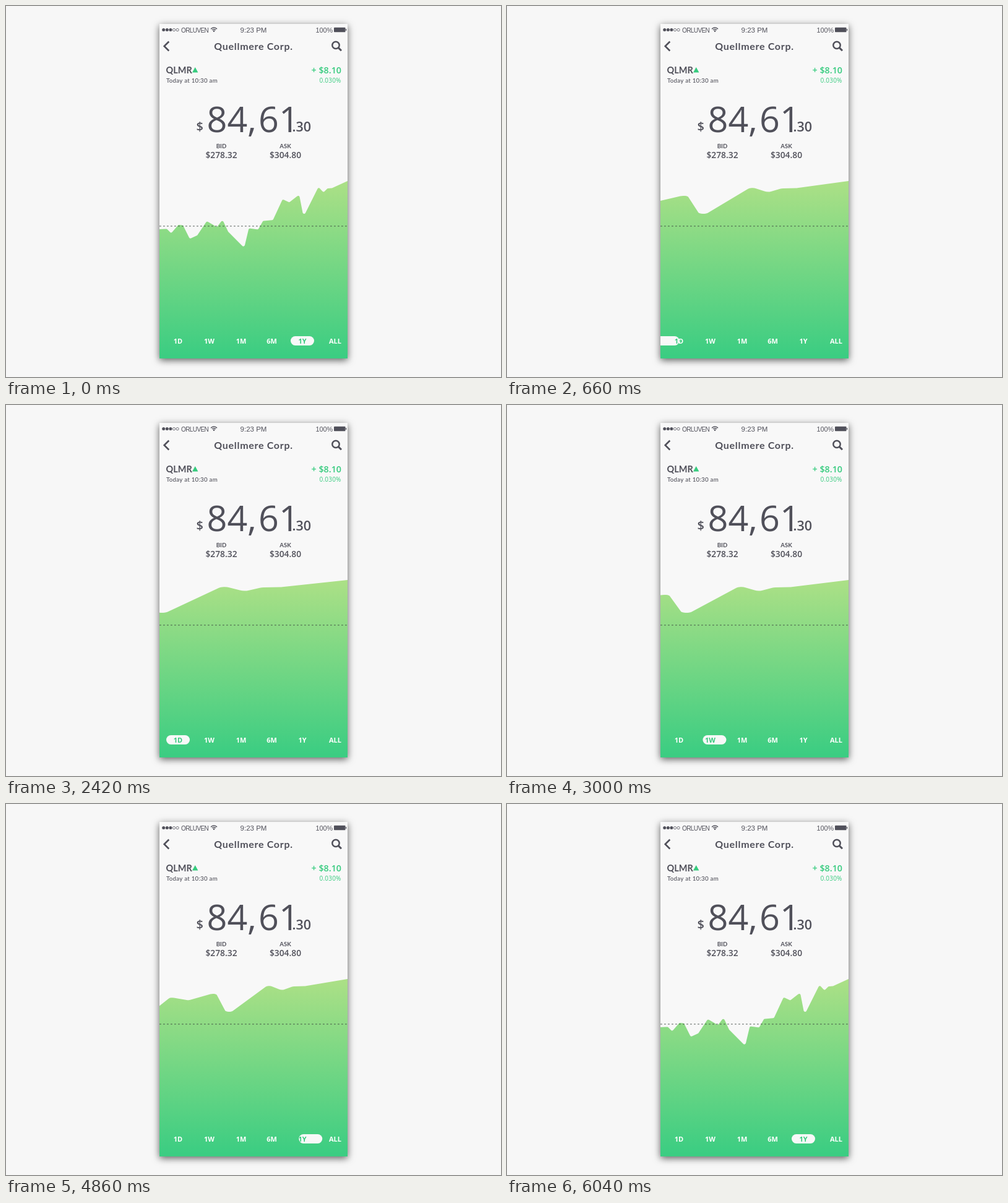
An HTML page with a canvas that plays this animation: 800 px wide and 600 px high, repeating every 6260 ms.

```html
<!DOCTYPE html>
<html lang="en">
<head>
<meta charset="utf-8">
<title>Stock chart</title>
<style>
html, body { margin: 0; width: 100%; height: 100%; overflow: hidden; background: #f7f7f7; }
canvas { display: block; width: 800px; height: 600px; }
</style>
</head>
<body>
<canvas id="stage" width="800" height="600"></canvas>
<script>
const ctx = document.getElementById('stage').getContext('2d');
const LOOP = 6260;
const INK = '#50505a', GREEN = '#36cb7e', PAPER = '#f8f8f8';
const PHONE = { x: 248, y: 29, w: 304, h: 541 };
const RIGHT = PHONE.x + PHONE.w;
const WORDS = 'Lato, sans-serif';
const DIGITS = '"Open Sans", sans-serif';
const SYSTEM = '"Liberation Sans", sans-serif';

const TABS = [['1D', 278], ['1W', 328.5], ['1M', 380], ['6M', 429.5], ['1Y', 479], ['ALL', 532]];

const PRICES = [
  [244, 361], [260, 360.5], [267, 367.5], [278.5, 354], [286, 354.5], [297, 376.5],
  [309, 371], [324.5, 348], [341, 357.5], [350, 345.5], [359, 365], [385, 391],
  [392.5, 359.5], [407.5, 361.5], [415.5, 347.5], [431.5, 346], [447, 312.5], [458, 317.5],
  [473.8, 305], [480.8, 341], [505, 292.5], [513, 301.5], [519.5, 295], [527, 294.5], [552, 283]
];

// Each change moves the pill with a spring and zooms the chart about its right edge.
const MOVES = [
  { pillAt: 360, zoomAt: 380, from: 479, to: 278, zoom0: 1, zoom1: 4.28 },
  { pillAt: 2760, zoomAt: 2760, from: 278, to: 328, zoom0: 4.28, zoom1: 3.2 },
  { pillAt: 4680, zoomAt: 4680, from: 328, to: 479, zoom0: 3.2, zoom1: 1 }
];
const ZOOM_TIME = 480;

function spring(ms) {
  if (ms <= 0) return 0;
  if (ms > 900) return 1;
  const t = ms / 1000, damp = 8.18, freq = 13.54;
  return 1 - Math.exp(-damp * t) * (Math.cos(freq * t) + damp / freq * Math.sin(freq * t));
}

function easeInOut(p) {
  p = Math.min(1, Math.max(0, p));
  return p < 0.5 ? 4 * p ** 3 : 1 - 4 * (1 - p) ** 3;
}

function poseAt(t) {
  let pill = 479, zoom = 1;
  for (const m of MOVES) {
    if (t >= m.pillAt) pill = m.from + (m.to - m.from) * spring(t - m.pillAt);
    if (t >= m.zoomAt) zoom = m.zoom0 + (m.zoom1 - m.zoom0) * easeInOut((t - m.zoomAt) / ZOOM_TIME);
  }
  return { pill, zoom };
}

function text(str, x, y, size, { weight = 400, color = INK, align = 'left', gap = 0, family = WORDS } = {}) {
  ctx.font = `${weight} ${size}px ${family}`;
  ctx.letterSpacing = gap + 'px';
  ctx.textAlign = align;
  ctx.fillStyle = color;
  ctx.fillText(str, x, y);
}

function stroke(points, width) {
  ctx.beginPath();
  points.forEach(([x, y]) => ctx.lineTo(x, y));
  ctx.strokeStyle = INK;
  ctx.lineWidth = width;
  ctx.stroke();
}

function circle(x, y, r) {
  ctx.beginPath();
  ctx.arc(x, y, r, 0, Math.PI * 2);
}

function drawPhone() {
  ctx.fillStyle = '#f7f7f7';
  ctx.fillRect(0, 0, 800, 600);
  ctx.save();
  ctx.shadowColor = 'rgba(0,0,0,.62)';
  ctx.shadowBlur = 11;
  ctx.shadowOffsetY = 3;
  ctx.fillStyle = PAPER;
  ctx.fillRect(PHONE.x, PHONE.y, PHONE.w, PHONE.h);
  ctx.restore();
}

function drawStatusBar() {
  ctx.fillStyle = ctx.strokeStyle = INK;
  for (let i = 0; i < 5; i++) {
    circle(254.7 + i * 5.6, 38.6, i < 3 ? 2.5 : 2.1);
    ctx.lineWidth = 0.8;
    i < 3 ? ctx.fill() : ctx.stroke();
  }
  text('ORLUVEN', 283, 42.5, 10, { family: SYSTEM, gap: -0.6 });
  text('9:23 PM', 400, 42.5, 11.5, { family: SYSTEM, align: 'center' });
  text('100%', 528, 42.5, 10.8, { family: SYSTEM, align: 'right' });

  ctx.lineWidth = 1.4;
  for (const r of [3.8, 6.5]) {
    ctx.beginPath();
    ctx.arc(336, 41.5, r, -Math.PI * 0.77, -Math.PI * 0.23);
    ctx.stroke();
  }
  circle(336, 40.6, 1.3);
  ctx.fill();

  ctx.beginPath();
  ctx.roundRect(530, 34.8, 18.5, 7.4, 1);
  ctx.fill();
  ctx.fillRect(549, 37, 1.2, 3);
}

function drawHeader() {
  stroke([[263.3, 57.5], [255.7, 65], [263.3, 72.5]], 2.6);
  circle(533, 63.4, 5.7);
  ctx.lineWidth = 2.5;
  ctx.stroke();
  stroke([[537, 67.4], [542, 72.3]], 3);
  text('Quellmere Corp.', 400, 70.5, 16, { weight: 700, align: 'center', gap: 0.7 });

  text('QLMR', 258.5, 109, 14.5, { weight: 700 });
  ctx.beginPath();
  ctx.moveTo(301, 107.5);
  ctx.lineTo(305.7, 99);
  ctx.lineTo(310.4, 107.5);
  ctx.fillStyle = GREEN;
  ctx.fill();
  text('Today at 10:30 am', 259, 124, 9.7, { weight: 500, gap: 0.25 });

  const gain = { color: GREEN, align: 'right', family: DIGITS };
  text('+ $8.10', 542, 109, 14.3, { ...gain, weight: 600 });
  text('0.030%', 541.5, 124, 10, { ...gain, weight: 500, gap: 0.2 });
}

function drawQuote() {
  const big = { align: 'center', family: DIGITS, weight: 500 };
  const small = { family: DIGITS, weight: 600 };
  text('$', 307.5, 202, 20, small);
  text('84', 357.5, 204, 57.5, big);
  text(',', 397.5, 204, 57.5, big);
  text('61', 441, 204, 57.5, big);
  text('.30', 462.5, 203, 21.5, small);
  for (const [name, price, x] of [['BID', '$278.32', 348], ['ASK', '$304.80', 451.5]]) {
    text(name, x, 230, 9.6, { weight: 700, align: 'center' });
    text(price, x, 246, 13.8, { ...small, align: 'center' });
  }
}

function drawChart(zoom) {
  ctx.save();
  ctx.beginPath();
  ctx.rect(PHONE.x, PHONE.y, PHONE.w, PHONE.h);
  ctx.clip();

  const fill = ctx.createLinearGradient(0, 283, 0, 566);
  fill.addColorStop(0, '#ace086');
  fill.addColorStop(1, '#3bcd82');
  ctx.save();
  ctx.translate(RIGHT, 0);
  ctx.scale(zoom, 1);
  ctx.translate(-RIGHT, 0);
  ctx.beginPath();
  ctx.moveTo(PRICES[0][0], PHONE.y + PHONE.h);
  ctx.lineTo(...PRICES[0]);
  for (let i = 1; i < PRICES.length - 1; i++) ctx.arcTo(...PRICES[i], ...PRICES[i + 1], 2.4);
  ctx.lineTo(...PRICES[PRICES.length - 1]);
  ctx.lineTo(RIGHT, PHONE.y + PHONE.h);
  ctx.fillStyle = fill;
  ctx.fill();
  ctx.restore();

  ctx.setLineDash([2.8, 3.2]);
  ctx.beginPath();
  ctx.moveTo(PHONE.x, 356);
  ctx.lineTo(RIGHT, 356);
  ctx.strokeStyle = 'rgba(55,65,60,.85)';
  ctx.lineWidth = 1.1;
  ctx.stroke();
  ctx.restore();
}

function drawLabels(color) {
  for (const [name, x] of TABS) {
    text(name, x, 546, 11, { weight: 700, color, align: 'center', family: DIGITS });
  }
}

function drawTabs(pill) {
  drawLabels('#fff');
  ctx.save();
  ctx.beginPath();
  ctx.rect(PHONE.x, PHONE.y, PHONE.w, PHONE.h);
  ctx.clip();
  ctx.beginPath();
  ctx.roundRect(pill - 19, 534, 38, 15, 7.5);
  ctx.fillStyle = PAPER;
  ctx.fill();
  ctx.clip();
  drawLabels(GREEN);
  ctx.restore();
}

const start = performance.now();

function frame(now) {
  const pose = poseAt(Math.max(0, now - start) % LOOP);
  drawPhone();
  drawStatusBar();
  drawHeader();
  drawQuote();
  drawChart(pose.zoom);
  drawTabs(pose.pill);
  requestAnimationFrame(frame);
}
frame(start);
</script>
</body>
</html>
```
